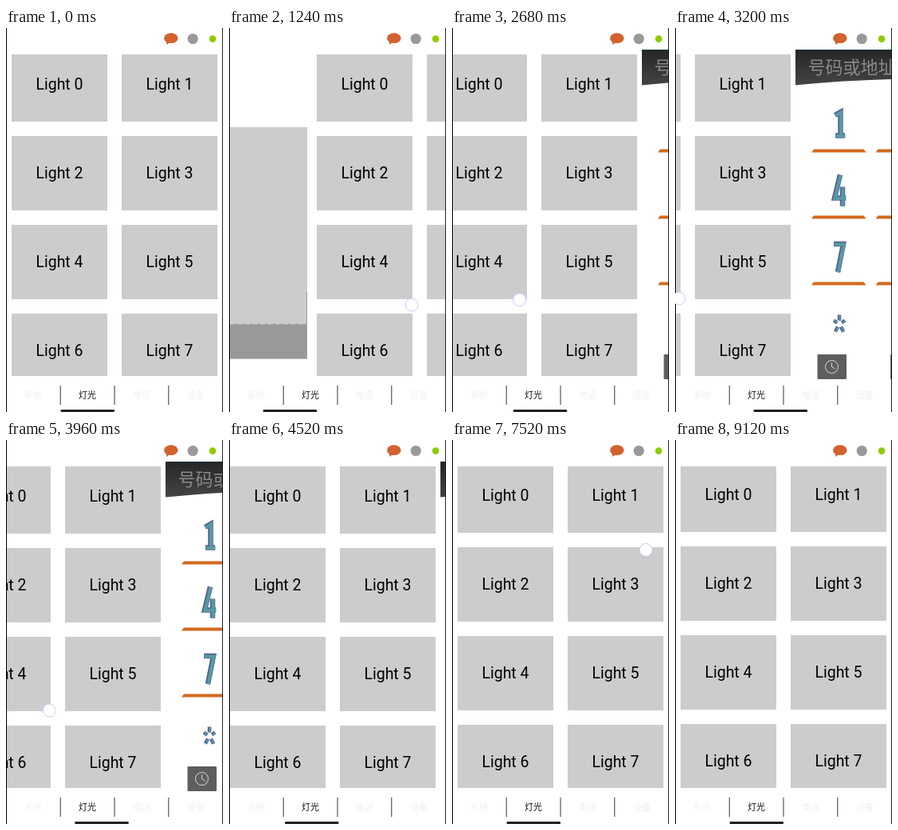
Write an HTML page that moves like this. It is 272x480 px and loops after 9.24 s.

```html
<!DOCTYPE html>
<html lang="zh">
<head>
<meta charset="utf-8">
<title>Swipe pages</title>
<style>
  html, body { margin: 0; width: 100%; height: 100%; overflow: hidden; background: #fff; }
  svg { display: block; width: 272px; height: 480px; }
  text { font-family: "Noto Sans CJK SC", "Noto Sans CJK", "Noto Sans", sans-serif; text-anchor: middle; }
  #lights text { font: 19.5px Roboto, sans-serif; }
</style>
</head>
<body>
<svg viewBox="0 0 272 480">
  <defs>
    <clipPath id="stageClip"><rect x="1" y="0" width="270" height="480"/></clipPath>
    <clipPath id="listClip"><rect x="0" y="33" width="272" height="402"/></clipPath>
    <linearGradient id="band" x1="0" y1="0" x2="0" y2="1">
      <stop offset="0" stop-color="#262626"/>
      <stop offset="1" stop-color="#444"/>
    </linearGradient>
  </defs>
  <rect width="272" height="480" fill="#fff"/>
  <g clip-path="url(#stageClip)">
    <g id="pages">
      <g id="chart"></g>
      <g clip-path="url(#listClip)"><g id="lights"></g></g>
      <g id="dialer"></g>
    </g>
  </g>
  <g id="status">
    <ellipse cx="206.8" cy="12.7" rx="8.8" ry="6.4" fill="#d2622f"/>
    <path d="M200.5 16L201.5 21L205 18Z" fill="#d2622f"/>
    <circle cx="234.2" cy="13.5" r="6.6" fill="#999"/>
    <circle cx="259" cy="13.6" r="4.3" fill="#8fcb00"/>
  </g>
  <g id="tabs"></g>
  <rect id="underline" x="68.5" y="477" width="67.5" height="3" rx="1" fill="#222"/>
  <path d="M.5 0V480" stroke="#000"/>
  <path d="M271.5 0V480" stroke="#222"/>
  <circle id="pointer" r="8" fill="#fff" stroke="#ccf"/>
</svg>
<script>
const LOOP = 9240, STEP = 40;
const $ = id => document.getElementById(id);

function add(parent, tag, attrs, text = "") {
  const el = document.createElementNS("http://www.w3.org/2000/svg", tag);
  for (const name in attrs) el.setAttribute(name, attrs[name]);
  el.textContent = text;
  parent.append(el);
  return el;
}

function buildLights() {
  for (let i = 0; i < 8; i++) {
    const x = 7 + 138 * (i % 2), y = 24 + 111 * (i >> 1);
    add($("lights"), "rect", { x, y, width: 120, height: 93, fill: "#ccc" });
    add($("lights"), "text", { x: x + 60, y: y + 53 }, "Light " + i);
  }
}

function buildChart() {
  add($("chart"), "rect", { x: -265, y: 124, width: 260, height: 289.5, fill: "#ccc" });
  let outline = "M-265 413.5";
  for (let x = -265; x < -5; x++) {
    const top = 369.5 + Math.round(Math.abs(Math.sin(x * 12.9)) * 1.3);
    outline += `V${top}H${x + 1}`;
  }
  add($("chart"), "path", { d: outline + "V413.5Z", fill: "#999" });
  return add($("chart"), "rect", { x: -6, width: 1, fill: "#999" });
}

function buildDialer() {
  const page = $("dialer");
  add(page, "path", { d: "M271 27H542V64Q380 60 271 71.5Z", fill: "url(#band)" });
  add(page, "path", { d: "M271 27.5H542", stroke: "#14303c" });
  add(page, "text", { x: 341.5, y: 57, "font-size": 22, fill: "#8a8a8a", "font-weight": 300 }, "号码或地址");
  const glyphs = [
    "M-5.5 -10L1.5 -14V17M-5 15.5H7",
    "M1 -19L-6 10H8M4 -4V20",
    "M-7 -16H5L-2 19",
    "M0 -11V-4M-7 -4L-3 -1M7 -4L3 -1M-5 10L-2 4M5 10L2 4"
  ];
  glyphs.forEach((d, row) => {
    const thick = row < 3 ? 6.5 : 4.5;
    const key = add(page, "g", { transform: `translate(326 ${119 + 83.5 * row})`, fill: "none" });
    add(key, "path", { d, stroke: "#56609a", "stroke-width": thick });
    add(key, "path", { d, stroke: "#579a9f", "stroke-width": thick - 2.5, transform: "translate(.5 .5)" });
    if (row === 3) return;
    for (const x of [291, 371.5]) {
      add(page, "path", { d: `M${x} ${155.5 + 83 * row}l3 -4h62.5l3 4z`, fill: "#d2691e" });
    }
  });
  for (const x of [298.5, 390]) {
    add(page, "rect", { x, y: 408, width: 36.5, height: 31, rx: 1, fill: "#5e5e5e" });
  }
  add(page, "circle", { cx: 316.5, cy: 423.5, r: 8, fill: "none", stroke: "#ddd" });
  add(page, "path", { d: "M316.5 418.5V423.5L320.5 426", fill: "none", stroke: "#ddd" });
}

function buildTabs() {
  ["系统", "灯光", "电话", "设备"].forEach((label, i) => {
    const active = i === 1;
    add($("tabs"), "text", {
      x: 34 + 68 * i, y: 463, "font-size": 11,
      fill: active ? "#111" : "#f0f0f0", "font-weight": active ? 500 : 300
    }, label);
    if (i) add($("tabs"), "path", { d: `M${67.75 * i + .5} 447V471`, stroke: "#555", "stroke-width": 1.2 });
  });
}

// Smooth curve through [time, value] points, flat at turning points and ends.
function curve(points) {
  const rate = i => (points[i + 1][1] - points[i][1]) / (points[i + 1][0] - points[i][0]);
  const slopes = points.map((_, i) => {
    if (!i || i === points.length - 1) return 0;
    const a = rate(i - 1), b = rate(i);
    return a * b > 0 ? 2 * a * b / (a + b) : 0;
  });
  return t => {
    if (t <= points[0][0]) return points[0][1];
    const i = points.findIndex(p => p[0] > t) - 1;
    if (i < 0) return points[points.length - 1][1];
    const [t0, v0] = points[i], [t1, v1] = points[i + 1];
    const span = t1 - t0, u = (t - t0) / span, w = 1 - u;
    return v0 * w * w * (1 + 2 * u) + v1 * u * u * (3 - 2 * u)
      + span * u * w * (slopes[i] * w - slopes[i + 1] * u);
  };
}

const pageShift = curve([[0, 0], [600, 38], [1240, 103], [1640, 122], [2240, 44],
  [2720, -40], [3200, -120], [3360, -124], [3900, -78], [4240, -30], [4520, -6], [4840, 0]]);
const listShift = curve([[6400, 0], [7000, -1], [7900, -1], [8500, -2]]);
const swipeX = curve([[0, 124], [1240, 126], [2240, 112], [3200, 125]]);
const swipeY = curve([[0, 347], [1240, 346], [2240, 342], [3200, 338]]);
const dragX = curve([[5160, 163.5], [6060, 252.5], [6320, 247.5], [7040, 243]]);
const dragY = curve([[5160, 321], [6080, 321], [6320, 317.5], [6640, 215], [7060, 49], [7700, 180], [8400, 300]]);

function pointerAt(t) {
  if (t >= 40 && t < 4160) return [pageShift(t) + swipeX(t), swipeY(t)];
  if (t >= 5160 && t < 8480) return [dragX(t), dragY(t)];
  return null;
}

buildLights();
const spike = buildChart();
buildDialer();
buildTabs();

function render(t) {
  const shift = Math.round(pageShift(t));
  $("pages").setAttribute("transform", `translate(${shift} 0)`);
  $("lights").setAttribute("transform", `translate(0 ${Math.round(listShift(t))})`);
  $("underline").setAttribute("x", 68.5 - shift / 4);

  const spikeTop = t < 1800 ? 330 : 360;
  spike.setAttribute("y", spikeTop);
  spike.setAttribute("height", 413 - spikeTop);

  const spot = pointerAt(t);
  $("pointer").setAttribute("visibility", spot ? "visible" : "hidden");
  if (spot) $("pointer").setAttribute("transform", `translate(${spot})`);
}

const start = performance.now();
function tick() {
  const t = (performance.now() - start) % LOOP;
  render(Math.floor(t / STEP) * STEP);
  requestAnimationFrame(tick);
}
render(0);
requestAnimationFrame(tick);
</script>
</body>
</html>
```
